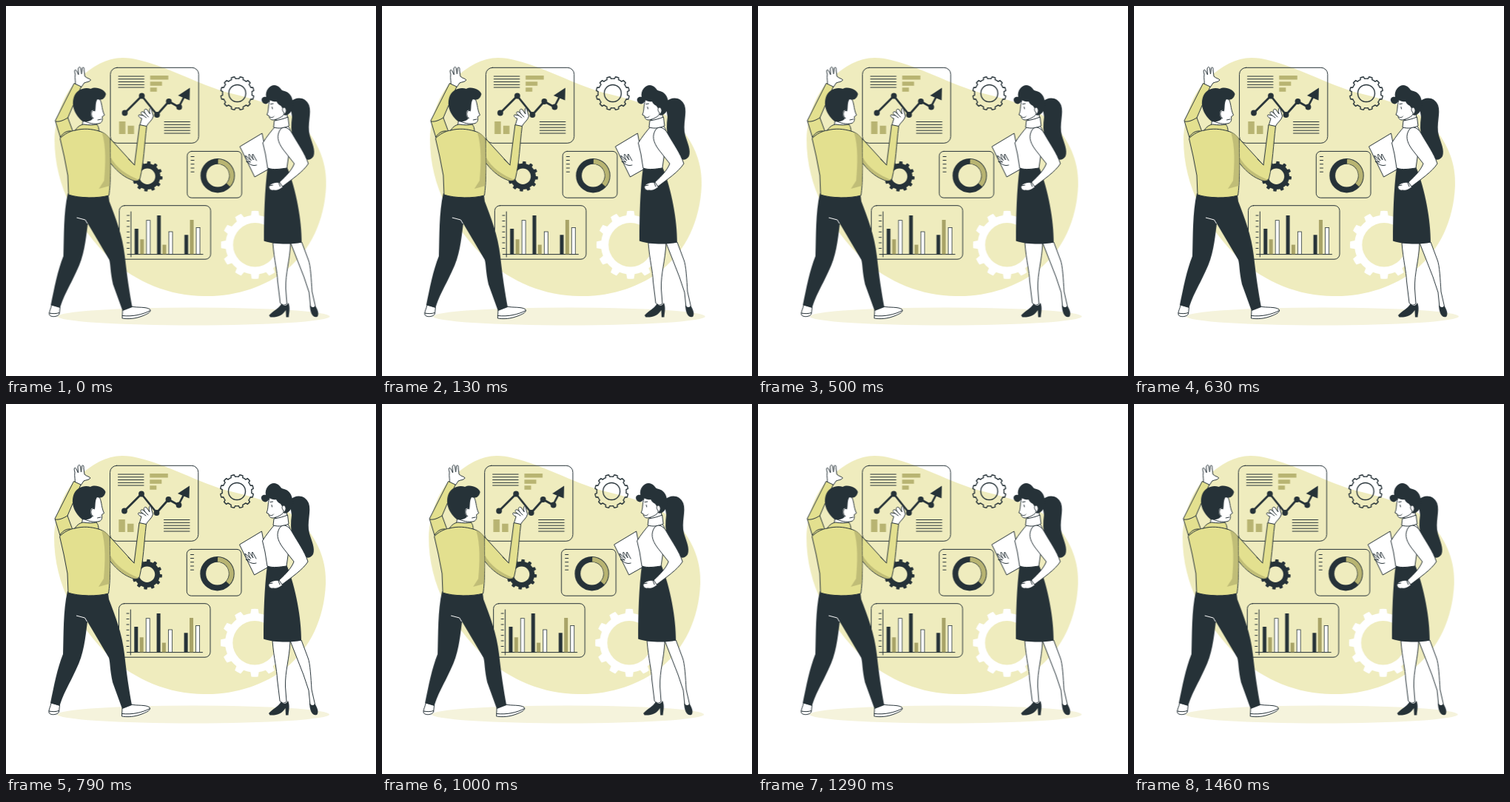
These frames come from a looping animation (500x500 px, 1.5 s). An HTML page:

```html
<!DOCTYPE html>
<html lang="en">
<head>
<meta charset="utf-8">
<title>Data presentation</title>
<style>
  html, body { margin: 0; width: 100%; height: 100%; overflow: hidden; background: #fff; }
  svg { display: block; width: 100vw; height: 100vh; }
  #scene { animation: shake 1.5s linear -22ms infinite; }
  @keyframes shake {
    0%, 100% { transform: translateX(0); }
    10%, 90% { transform: translateX(-1px); }
    20%, 80% { transform: translateX(2px); }
    30%, 50%, 70% { transform: translateX(-4px); }
    40%, 60% { transform: translateX(4px); }
  }
  .line { fill: none; stroke: #263238; stroke-width: 1; stroke-linecap: round; stroke-linejoin: round; }
  .skin { fill: #fff; stroke: #263238; stroke-width: 1; stroke-linejoin: round; }
  .shirt { fill: #e3e08f; stroke: #263238; stroke-width: 1; stroke-linejoin: round; }
  .dark { fill: #263238; }
  .olive { fill: #b8b472; }
  .shade { fill: #b8b472; opacity: .8; }
  .pale { fill: #efecbe; }
</style>
</head>
<body>
<svg viewBox="0.3 0 500 500">
  <g id="scene">
    <path class="pale" d="M66 180C67 150 78 118 98 99C117 81 137 70 158 70C166 70 173 71 180 73C222 83 258 105 300 117C345 128 378 137 402 162C425 187 434 215 433 243C431 290 412 330 380 356C350 380 310 393 268 392C222 392 176 373 142 342C98 300 66 245 66 180Z"/>
    <ellipse cx="254" cy="419.5" rx="184" ry="12" fill="#f5f3dc"/>

    <g id="gears"></g>

    <g id="trend">
      <rect class="line" x="141.5" y="83.3" width="119.3" height="102" rx="9"/>
      <path class="line" d="M152.500 95H187M152.500 98.700H187M152.500 102.500H187M152.500 106.300H187M152.500 110H187M214.500 156.500H249M214.500 160.300H249M214.500 164.200H249M214.500 168.200H249M214.500 172H249"/>
      <path class="olive" d="M195.300 94h24.500v5.500h-24.500zM195.300 102.200h16v5.600h-16zM195.300 110.300h9v5.400h-9zM153.300 156h8.500v17h-8.500zM165 161.700h8.500v11.300h-8.500z"/>
      <path class="line" style="stroke-width:2.700" d="M161 144.500L184 121.500L204.500 147L220.500 129L234 136.500L242 121"/>
      <path class="dark" d="M249 110.500L233 121L248.500 127.500Z"/>
      <g id="dots" class="dark"></g>
    </g>

    <g id="donut">
      <rect class="line" x="245.300" y="196.400" width="73.700" height="62.800" rx="6"/>
      <path class="line" d="M250.500 203.500h4M250.500 208.500h4M250.500 213.700h4M250.500 219h4M250.500 224.200h4"/>
      <circle cx="286.500" cy="229.200" r="19.300" fill="none" stroke="#263238" stroke-width="7.800"/>
      <path d="M287 210.100A19.100 19.100 0 0 1 300.800 241.900" fill="none" stroke="#b8b472" stroke-width="6.200"/>
    </g>

    <g id="columns">
      <rect class="line" x="153.500" y="269.700" width="123.500" height="72.500" rx="7"/>
      <path class="line" d="M169.300 278V339M164.500 335.600H266.500M164 283h3M164 290.500h3M164 298h3M164 305.300h3M164 312.700h3M164 320h3M164 327.500h3"/>
    </g>

    <g id="man">
      <path class="skin" d="M62 404L73.500 407L72.500 416C71 420.500 60 421 59 417C58.500 412 61 410 62 404Z"/>
      <path class="line" d="M59 415C63 416 69 416 72.500 414.500"/>
      <path class="skin" d="M158 411L170 406C178 408 190 406 195 410C198 414 188 418 180 420.500C172 423 163 423 157.500 422Z"/>
      <path class="line" d="M157.500 418.500C172 420 185 417 195.500 411.500"/>
      <path class="dark" d="M84 253C100 259 125 260 139 256L140 264C148 285 158 310 161 338C164 365 167 385 171 407L158 412L145 376C141 358 142 350 140 343L111 294C108 318 106 338 96 358C85 382 79 390 73.500 408L61 404C66 380 70 358 78 338C79 310 78 280 84 253Z"/>
      <path d="M96 286L107.500 289L110.500 294" fill="none" stroke="#fff"/>
      <path class="skin" d="M94 107C95 103 93 98 94 92C92 87 94 84 96 88L98.500 93L98 85C99 81 101 82 101.500 85L102.500 92L103.500 84C105 81 106.500 84 106 87L107 95C110 98 114 98 115 100C113 103 109 102.500 106 104L102 110Z"/>
      <path class="shirt" d="M92.500 104.500L102 109L84 151L91 170L75 181L67 155Z"/>
      <path class="line" d="M68 156C73 157 79 154 84 151M74 177C78 170 86 167 91 170"/>
      <path class="skin" d="M181 162L184 152C180 151 178 147 181 147L186 148C181 145 183 142 186 143L190 147C185 141 188 138 191 140L195 146C193 138 196 136 197 140L199.500 149C198 155 193 157 190 163Z"/>
      <path class="line" d="M186 148L190 151M190 147L193 150"/>
      <path class="shirt" d="M141 179L174 215L181 160.500L190.500 162.500C187 190 187 210 181.500 233C179 237 174 237 168 234C158 230 148 221 140 210Z"/>
      <path class="shade" d="M141 203C150 220 164 228 180 235C178 237 173 236 168 233.500C158 229 148 221 141 210Z"/>
      <path class="line" d="M174 215L166 207"/>
      <path class="skin" d="M105 152L103 164C108 171 120 172 125 167L122 156Z"/>
      <path class="skin" d="M126 124C131 131 129 138 133.500 147.500L130.500 149.500C131 154 131 158 125 159C116 160 108 157 105 154C100 140 112 123 126 124Z"/>
      <path class="shirt" d="M94 168C97 163 102 160 106 160C112 161 119 161 123 160C126 163 126 167 126 169C133 171 138 175 141 180C142 215 142 240 139.500 256C125 260 100 260 85 255L84 229L79 203L73.500 179C79 173 87 169 94 168Z"/>
      <path class="shade" d="M130 170.500C137 173 140 177 141 180C142 207 142 229 140.500 243L126 247L133 236C135 214 136 190 130 170.500Z"/>
      <path class="line" d="M94 168C105 165 116 166 126 169"/>
      <path class="dark" d="M93 121C97 112 108 109 115 112C122 108 134 113 135.500 119C134 126 129 128 124 126C121 130 122 137 121 142C115 137 113 148 118 152L116 154C113 156 108 157 104 156C95 149 87 135 93 121Z"/>
      <path class="skin" d="M121 142C115 139 114 149 119 152"/>
      <path class="line" d="M124.500 154L129 153"/>
    </g>

    <g id="woman">
      <path class="dark" d="M384 130C392 122 405 122 410 134C414 145 407 160 411 175C414 185 419 195 416 203C412 210 403 209 398 201C388 190 384 170 387 150Z"/>
      <path class="skin" d="M316.500 190L346.500 172L356 220L336.500 231Z"/>
      <path class="skin" d="M361 320C363 345 367 358 367.500 372L371 401C373 405 378 405 380 402L378.500 382C378 360 384 345 385 320Z"/>
      <path class="skin" d="M385 320L403 366L410 387L412 407L419 408L414 386C413 370 412 350 409 343L400 319Z"/>
      <path class="dark" d="M356 418C362 411 368 410 373 402C376 406 379 406 382 401C385 408 383 414 382.500 420.500L379 420.500L378.500 411C374 418 368 421 357.500 420.500Z"/>
      <path class="dark" d="M411 402C412 408 416 409 418 405C422 410 424 417 421 420C415 422 411 415 411 402Z"/>
      <path class="dark" d="M354 218C363 222 372 221 380 217C393 249 400 290 400 319.500C385 323 362 322 349 317.500C349 285 350 248 354 218Z"/>
      <path class="skin" d="M364 163C359 169 353 176 347.500 185L351 200L354 219C362 222 372 220 380 219L382 205L385 170C384 163 380 160 375 161Z"/>
      <path class="skin" d="M366 147L365 160L382 160L380 144Z"/>
      <path class="skin" d="M363 155C370 154 377 152 381.500 150L383 162C376 165 370 166 362 164Z"/>
      <path class="skin" d="M357 127C354 137 356 140 353 147L356 148.500C356 153 360 155 364 153.500C370 152 376 148 377 145C379 128 369 121 357 127Z"/>
      <path class="line" d="M360 136.500L360.500 139M358 132.500L361.500 132M357 150C360 151.500 361 150.500 362.500 149"/>
      <path class="dark" d="M346 128C345 123 350 122 352 123C350 112 360 104 367 108C373 111 371 114 377 115C388 118 390 132 387 140C384 147 378 149 376 147C377 142 374 138 372 135C368 133 367 131 366 129C362 130 359 128 357 127C355 134 348 134 346 128Z"/>
      <path class="skin" d="M376 144C372 140 375 135 378 138C380 141 379 144 376 147Z"/>
      <path class="skin" d="M373 239C366 237 359 239 356 243C355 247 358 250 362 249C367 250 371 248 375 244Z"/>
      <path class="line" d="M356 243L361 242M369 239L371 244"/>
      <path class="skin" d="M371 167C376 161 383 165 387 172C396 188 404 198 409 213C402 224 387 234 374 244L370 238C380 229 387 221 390 213L375 194C367 183 366 175 371 167Z"/>
      <path class="line" d="M339 215C333 217 329 213 325 210L331 211C327 208 324 205 324 202L332 209C329 205 328 202 329 200L335 208C333 204 333 201 334 200L339 209"/>
    </g>
  </g>
</svg>
<script>
  const INK = '#263238', OLIVE = '#a8a367';
  const add = (id, tag, attrs) => {
    const el = document.createElementNS('http://www.w3.org/2000/svg', tag);
    for (const key in attrs) el.setAttribute(key, attrs[key]);
    document.getElementById(id).append(el);
  };

  // turn is a fraction of one tooth
  function gear(cx, cy, outer, root, hole, teeth, turn, style) {
    const step = 2 * Math.PI / teeth, start = turn * step - Math.PI / 2;
    const at = (r, a) => `${(cx + r * Math.cos(a)).toFixed(2)} ${(cy + r * Math.sin(a)).toFixed(2)}`;
    let d = '';
    for (let i = 0; i < teeth; i++) {
      const a = start + i * step;
      d += `${i ? `A${root} ${root} 0 0 1 ` : 'M'}${at(root, a - step * .27)}`
        + `L${at(outer, a - step * .19)}A${outer} ${outer} 0 0 1 ${at(outer, a + step * .19)}`
        + `L${at(root, a + step * .27)}`;
    }
    d += `A${root} ${root} 0 0 1 ${at(root, start - step * .27)}Z`
      + `M${cx - hole} ${cy}a${hole} ${hole} 0 1 0 ${2 * hole} 0a${hole} ${hole} 0 1 0 ${-2 * hole} 0Z`;
    add('gears', 'path', { d, 'fill-rule': 'evenodd', ...style });
  }
  gear(313, 118, 22.5, 19.9, 11.5, 12, .5, { fill: 'none', stroke: INK, 'stroke-width': 1.4, 'stroke-linejoin': 'round' });
  gear(191.5, 230.3, 20.5, 17.5, 10.7, 12, .2, { fill: INK });
  gear(337, 322.7, 46, 40, 29.7, 12, 0, { fill: '#fff' });

  for (const [cx, cy] of [[161, 144.5], [184, 121.5], [204.5, 147], [220.5, 129], [234.5, 136.5]])
    add('dots', 'circle', { cx, cy, r: 3.9 });

  const BASE = 335.4;
  const bars = [
    [174.3, 301], [181.7, 315.3], [190.2, 289.7],
    [204.6, 283], [211.9, 322.6], [220.5, 305],
    [241.6, 309.3], [249, 289], [257.6, 299.5],
  ];
  bars.forEach(([x, y], i) => add('columns', 'rect', {
    x, y, width: 5, height: BASE - y,
    fill: [INK, OLIVE, '#fff'][i % 3],
    stroke: i % 3 === 2 ? INK : 'none', 'stroke-width': .8,
  }));
</script>
</body>
</html>
```
